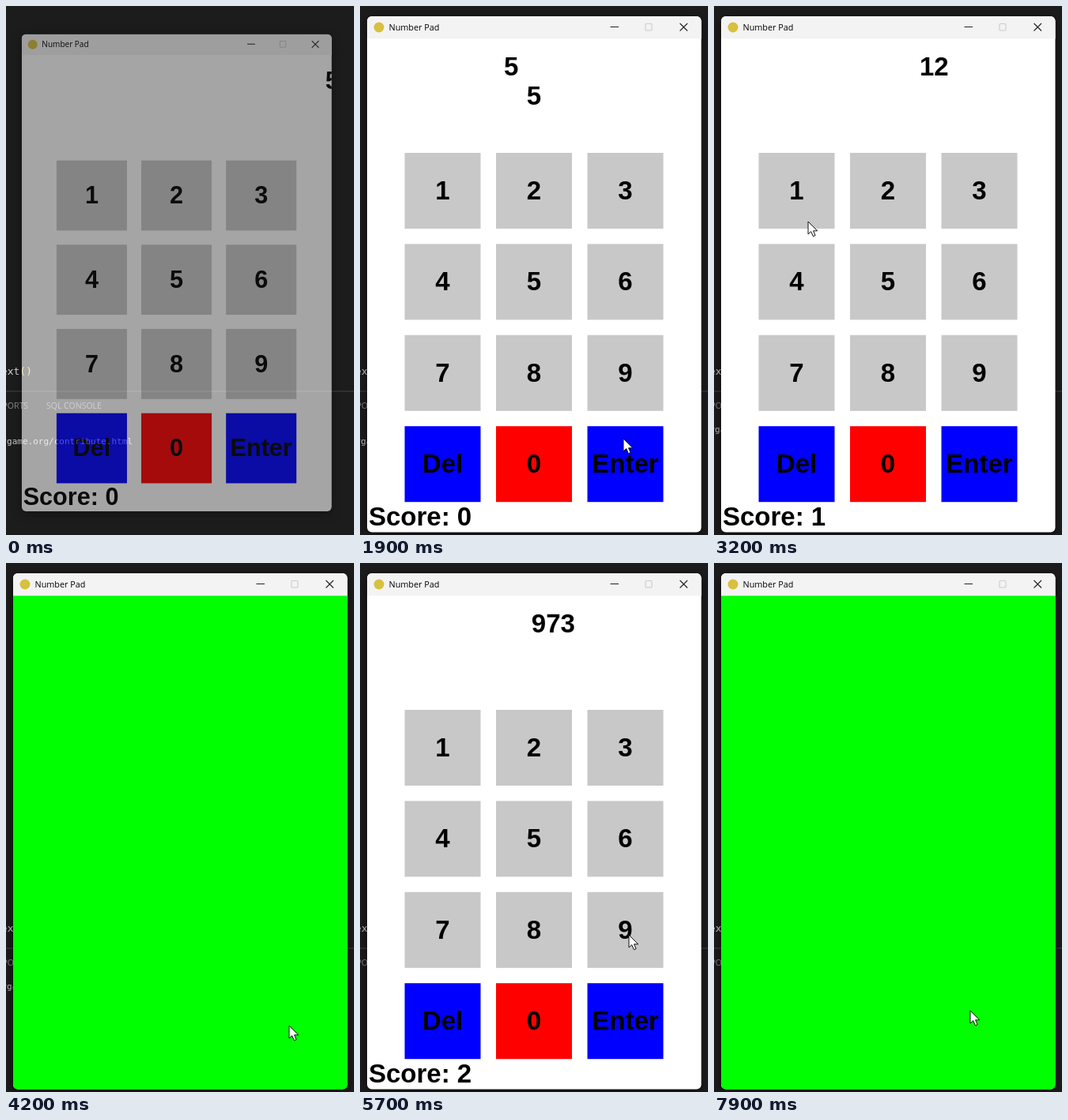
An HTML page for the animation above (8000 ms loop, 440 by 670 pixels).

```html
<!DOCTYPE html>
<html lang="en">
<head>
<meta charset="utf-8">
<title>Number Pad</title>
<style>
  html, body { margin: 0; width: 100%; height: 100%; overflow: hidden; background: #1c1c1c; }
  svg { display: block; }
  text { white-space: pre; }
  .big { font: bold 33px "Liberation Sans", Arial, sans-serif; }
  .mid { text-anchor: middle; }
  .title { font: 10.8px "Open Sans", sans-serif; }
  .tab { font: 10.5px "Open Sans", sans-serif; fill: #8c8c8c; }
  .code { font: 13px "DejaVu Sans Mono", monospace; fill: #d4d4d4; }
  .log { font: 11px "DejaVu Sans Mono", monospace; fill: #ccc; text-anchor: end; }
  #win { filter: drop-shadow(0 3px 7px rgba(0, 0, 0, .55)); }
</style>
</head>
<body>
<svg width="440" height="670" viewBox="0 0 440 670">
  <defs>
    <clipPath id="frame"><rect x="9" y="13" width="422.5" height="653.5" rx="6"/></clipPath>
  </defs>

  <!-- editor behind the window -->
  <rect width="440" height="670" fill="#1c1c1c"/>
  <text class="code" x="-14" y="467">text<tspan fill="#f0d040">()</tspan></text>
  <path d="M0 488H440" stroke="#464646"/>
  <text class="tab" x="28" y="510" text-anchor="end">PORTS</text>
  <text class="tab" x="51" y="510">SQL CONSOLE</text>
  <text class="log" id="log" x="160" y="555">https://www.pygame.org/contribute.html</text>

  <g id="win">
    <g clip-path="url(#frame)">
      <rect x="9" y="13" width="423" height="654" fill="#fff"/>
      <g id="pad"></g>
      <text class="big" id="target" y="88"></text>
      <text class="big mid" id="typed" x="220" y="125"></text>
      <text class="big" id="score" x="11" y="658"></text>
      <rect id="flash" x="9" y="41" width="423" height="626" fill="#0f0"/>
      <rect x="9" y="13" width="423" height="28.5" fill="#f3f3f3"/>
      <circle cx="24" cy="27" r="6.5" fill="#d8c040"/>
      <text class="title" x="36.5" y="31">Number Pad</text>
      <g fill="none" stroke="#222" stroke-width="1.1">
        <path d="M316.5 26.5h10.5M404.5 22l9.5 9.5m0-9.5l-9.5 9.5"/>
        <rect x="361" y="22.5" width="8" height="8.5" rx="1" stroke="#ccc"/>
      </g>
    </g>
  </g>
  <path id="cursor" d="M0 0V16l3.7-3.4 2.7 6.2 2.7-1.2-2.6-5.8h5.2z" fill="#fff" stroke="#111"/>
</svg>

<script>
const LOOP = 8000;
const $ = id => document.getElementById(id);

// time of first frame, start x, speed in px/s
const rounds = [
  { start: 0, text: "5", x: 423, speed: 126.8 },
  { start: 2050, text: "12", x: 424, speed: 142.5 },
  { start: 4350, text: "973", x: 433.8, speed: 160.6 }
];
const keys = [[1150, "5"], [3300, "1"], [3650, "2"], [5800, "9"], [6400, "7"], [7150, "3"]];
const flashes = [[1950, 2050], [4150, 4350], [7850, LOOP]];
const path = [
  [300, 260, 690], [1000, 225, 360], [1250, 225, 360], [1800, 333, 548], [2050, 333, 548],
  [2900, 119, 273], [3300, 119, 273], [3580, 225, 250], [3720, 225, 250], [4120, 358, 586],
  [4600, 358, 586], [5350, 364, 572], [5700, 340, 471], [5900, 340, 471], [6320, 110, 468],
  [6500, 110, 468], [7050, 341, 251], [7350, 341, 251], [7800, 324, 567]
];

$("pad").innerHTML = "1 2 3 4 5 6 7 8 9 Del 0 Enter".split(" ").map((label, i) => {
  const x = 56.5 + i % 3 * 115.5, y = 186 + Math.floor(i / 3) * 115.4;
  const fill = label === "0" ? "#f00" : i > 8 ? "#00f" : "#c8c8c8";
  return `<rect x="${x}" y="${y}" width="96" height="96" fill="${fill}"/>
    <text class="big mid" x="${x + 48}" y="${y + 59}">${label}</text>`;
}).join("");

function cursorAt(t) {
  const i = path.findIndex(p => p[0] > t);
  if (i < 0) return path[path.length - 1].slice(1);
  if (i === 0) return path[0].slice(1);
  const [t0, x0, y0] = path[i - 1], [t1, x1, y1] = path[i];
  const k = (t - t0) / (t1 - t0), e = k * k * (3 - 2 * k);
  return [x0 + (x1 - x0) * e, y0 + (y1 - y0) * e];
}

function openWindow(t) {
  const rest = (1 - Math.min(t / 220, 1)) ** 3;
  const cx = 220 - 4.5 * rest, cy = 340 - 2 * rest;
  $("win").setAttribute("transform",
    `translate(${cx} ${cy}) scale(${1 - .0735 * rest} ${1 - .0765 * rest}) translate(-220 -340)`);
  $("win").setAttribute("opacity", Math.min(1, .6 + t / 250));
}

function draw(t) {
  const level = rounds.filter(r => r.start <= t).length - 1;
  const round = rounds[level];
  openWindow(t);
  $("target").textContent = round.text;
  // the third number enters just after its flash
  const since = level === 0 ? t : t - (level === 1 ? 2050 : 4350);
  $("target").setAttribute("x", round.x - round.speed * since / 1000);
  $("typed").textContent = keys.filter(k => k[0] >= round.start && k[0] <= t).map(k => k[1]).join("");
  $("score").textContent = "Score: " + level;
  $("flash").style.display = flashes.some(([a, b]) => t >= a && t < b) ? "" : "none";
  $("log").setAttribute("y", level ? 540 : 555);
  $("log").style.display = level < 2 ? "" : "none";
  $("cursor").setAttribute("transform", `translate(${cursorAt(t)})`);
}

const begin = performance.now();
function tick() {
  draw((performance.now() - begin) % LOOP);
  requestAnimationFrame(tick);
}
draw(0);
requestAnimationFrame(tick);
</script>
</body>
</html>
```
